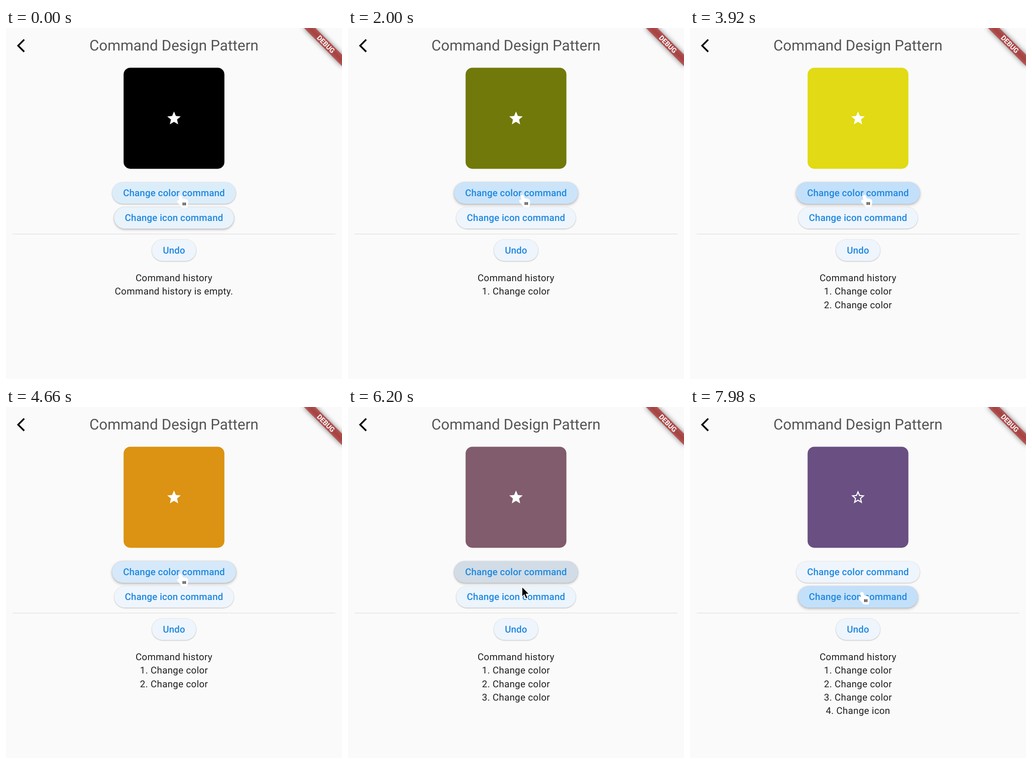
These frames come from a looping animation (733 px wide and 764 px high, 8 s). An HTML page:

```html
<!DOCTYPE html>
<html lang="en">
<head>
<meta charset="utf-8">
<title>Command Design Pattern</title>
<style>
  html, body { margin: 0; width: 100%; height: 100%; overflow: hidden; background: #fafafa; }
  #stage { position: absolute; left: 0; top: 0; width: 733px; height: 764px; overflow: hidden; background: #fafafa; }
  #boxes { position: absolute; left: 0; top: 0; width: 500px; height: 521px; transform: scale(1.466); transform-origin: 0 0; }
  #boxes div { position: absolute; }
  #square { left: 175px; top: 59px; width: 150px; height: 150px; border-radius: 10px; }
  .button { height: 32px; border-radius: 16px; overflow: hidden; }
  #color { left: 158.3px; top: 229px; width: 183.4px; }
  #icon { left: 160.8px; top: 266px; width: 178.4px; }
  #undo { left: 216.8px; top: 314px; width: 66.4px; }
  .ripple { border-radius: 50%; background: #2196f3; }
  svg { position: absolute; left: 0; top: 0; width: 733px; height: 764px; }
  text { font-family: Roboto, sans-serif; text-anchor: middle; text-rendering: geometricPrecision; }
  .label { font-size: 14px; font-weight: 500; letter-spacing: .1px; fill: #1e88e0; }
  .body { font-size: 14px; letter-spacing: .25px; fill: #1f1f1f; }
</style>
</head>
<body>
<div id="stage">
  <div id="boxes">
    <div id="square"></div>
    <div id="color" class="button"><div class="ripple"></div></div>
    <div id="icon" class="button"><div class="ripple"></div></div>
    <div id="undo" class="button"></div>
  </div>
  <svg viewBox="0 0 500 521.146">
    <defs>
      <filter id="blur" x="-50%" y="-150%" width="200%" height="400%"><feGaussianBlur stdDeviation="3.9"/></filter>
    </defs>
    <path transform="translate(16.3 14.2)" d="M11.67 3.87 9.9 2.1 0 12l9.9 9.9 1.77-1.77L3.54 12z"/>
    <text x="250" y="33.1" font-size="22" fill="#545454">Command Design Pattern</text>
    <path id="star" transform="translate(238 122)" fill="#fff" fill-rule="evenodd"/>
    <text class="label" x="250" y="249.8">Change color command</text>
    <text class="label" x="250" y="286.8">Change icon command</text>
    <path d="M10 306H490" stroke="#e1e1e2"/>
    <text class="label" x="250" y="334.8">Undo</text>
    <text class="body" x="250" y="375.8">Command history</text>
    <g id="history"></g>
    <g transform="translate(500 0) rotate(45)">
      <rect x="-40" y="28" width="80" height="12" fill-opacity=".5" filter="url(#blur)"/>
      <rect x="-40" y="28" width="80" height="12" fill="#b71c1c" fill-opacity=".63"/>
      <text y="37.6" font-size="10.2" font-weight="700" fill="#fff">DEBUG</text>
    </g>
  </svg>
  <svg viewBox="0 0 733 764">
    <g id="hand" stroke-linejoin="round" stroke-linecap="round">
      <path id="palm" fill="#fff" stroke="#fff" stroke-width="3.4" d="M4.5 3C4 .8 7.5 .2 8.3 2.5L10.3 9.3C11 7.5 13.8 7.8 14 9.6 15 8.2 17.6 8.7 17.8 10.6 18.8 9.6 21 10.2 21.3 12.5 22 16 22 18 20.3 21L20 24.3H10.5C9.5 21.5 6.5 19 4.8 17.2 3 15.5 1 13.8 1.2 12.3 2 10.8 4.5 11.3 7 13.8Z"/>
      <use href="#palm" style="stroke:#000"/>
      <path fill="none" stroke="#000" stroke-width="1.4" d="M12.2 15.5v5M14.9 15.5v5M17.6 15.5v5"/>
    </g>
    <path id="arrow" stroke="#fff" stroke-width="1.5" d="M0 0V22.5L5 17.8 8.6 26.2 12.6 24.5 9.1 16.2H16Z"/>
  </svg>
</div>
<script>
const $ = id => document.getElementById(id);
const LOOP = 8000;
const FADE = 20;
const STAR = 'M12 17.27 18.18 21l-1.64-7.03L22 9.24l-7.19-.61L12 2 9.19 8.63 2 9.24l5.46 4.73L5.82 21z';
const HOLLOW = 'M12 15.4l-3.76 2.27 1-4.28-3.32-2.88 4.38-.38L12 6.1l1.71 4.04 4.38.38-3.32 2.88 1 4.28z';

const REST = [239, 245, 252], HOVER = [214, 233, 250];

// Steps are [tick, ...values].
const squareTrack = [
  [34, 0, 0, 0], [34 + FADE, 226, 242, 20],
  [79, 226, 242, 20], [79 + FADE, 220, 146, 18],
  [118, 220, 146, 18], [118 + FADE, 105, 79, 130]
];
// Button values: red, green, blue, elevation.
const buttonTracks = {
  color: [[0, 220, 237, 250, .2], [5, ...HOVER, 1], [129, ...HOVER, 1],
          [134, 209, 220, 230, .8], [140, ...REST, 0]],
  icon: [[0, 233, 243, 251, .7], [4, ...REST, 0], [133, ...REST, 0],
         [135, 233, 243, 251, .1], [141, ...HOVER, 1]],
  undo: [[0, ...REST, 0]]
};
const cursorTrack = [
  [0, 374, 365], [3, 374, 364], [127, 374, 364], [131, 374, 376],
  [134, 374, 390], [141, 368.5, 403.5]
];
const presses = [
  { at: 34, button: 'color', hold: 6 },
  { at: 79, button: 'color', hold: 6 },
  { at: 118, button: 'color', hold: 6 },
  { at: 160, button: 'icon', hold: 11 }
];

const clamp = x => Math.min(1, Math.max(0, x));

function sample(track, tick) {
  const next = track.findIndex(step => step[0] > tick);
  if (next === 0) return track[0].slice(1);
  if (next < 0) return track[track.length - 1].slice(1);
  const a = track[next - 1], b = track[next];
  const k = (tick - a[0]) / (b[0] - a[0]);
  return a.slice(1).map((v, i) => v + (b[i + 1] - v) * k);
}

const rgb = c => `rgb(${c.slice(0, 3).map(Math.round)})`;

// Three ticks per 140 ms: two short ones, then a long one.
function tickAt(ms) {
  const rest = ms % 140;
  return 3 * Math.floor(ms / 140) + (rest < 20 ? 0 : rest < 40 ? 1 : 2);
}

function drawButton(id, tick) {
  const values = sample(buttonTracks[id], tick), e = values[3];
  const style = $(id).style;
  style.background = rgb(values);
  style.boxShadow = `0 ${.7 + e}px ${1.6 + 2.4 * e}px rgba(0,0,0,${.22 + .04 * e}), ` +
    `0 0 ${1 + e}px rgba(0,0,0,${.16 + .02 * e})`;

  const ripple = $(id).firstElementChild;
  if (!ripple) return;
  const press = presses.find(p => p.button === id && tick >= p.at - 5 && tick < p.at + p.hold + 9);
  ripple.style.opacity = press ? .1 * (1 - clamp((tick - press.at - press.hold) / 9)) : 0;
  if (!press) return;
  const radius = 8 + 102 * clamp((tick - press.at + 5) / 11);
  ripple.style.left = 101 - radius + 'px';
  ripple.style.top = 18 - radius + 'px';
  ripple.style.width = ripple.style.height = 2 * radius + 'px';
}

let shownHistory = null;
function drawHistory(tick) {
  const done = presses.filter(p => tick >= p.at);
  const lines = done.length
    ? done.map((p, i) => `${i + 1}. Change ${p.button}`)
    : ['Command history is empty.'];
  const key = lines.join();
  if (key === shownHistory) return;
  shownHistory = key;
  $('history').innerHTML = lines
    .map((line, i) => `<text class="body" x="250" y="${395.8 + 20 * i}">${line}</text>`).join('');
}

function drawCursor(tick) {
  const [x, y] = sample(cursorTrack, tick);
  const between = tick >= 132 && tick <= 135;
  $('hand').style.display = between ? 'none' : '';
  $('arrow').style.display = between ? '' : 'none';
  $('hand').setAttribute('transform', `translate(${x} ${y})`);
  $('arrow').setAttribute('transform', `translate(${x + 5.5} ${y + 1})`);
}

function draw(ms) {
  const tick = tickAt(ms % LOOP);
  $('square').style.background = rgb(sample(squareTrack, tick));
  $('star').setAttribute('d', tick >= presses[3].at ? STAR + HOLLOW : STAR);
  Object.keys(buttonTracks).forEach(id => drawButton(id, tick));
  drawHistory(tick);
  drawCursor(tick);
}

const start = performance.now();
function loop() {
  draw(performance.now() - start);
  requestAnimationFrame(loop);
}
loop();
</script>
</body>
</html>
```
